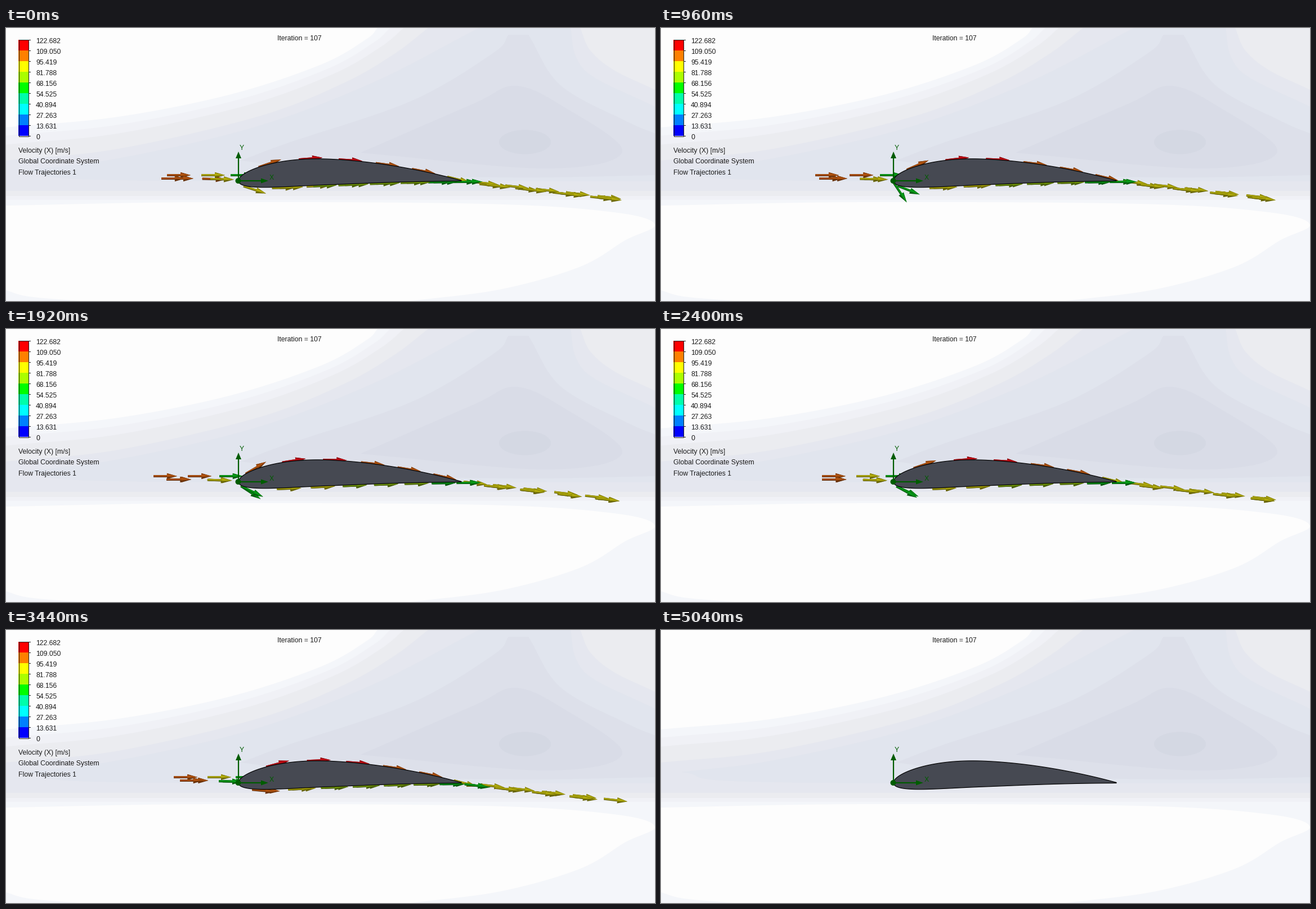
Animation, 1153 px wide and 486 px high, one loop 5080 ms. Source, as a matplotlib script:

```python
import numpy as np
import matplotlib.pyplot as plt
from matplotlib.animation import FuncAnimation
from matplotlib.collections import PolyCollection
from matplotlib.patches import Circle, Ellipse, Polygon, Rectangle

W, H, DPI = 1153, 486, 64
PX = 72 / DPI
FRAMES, STEP_MS = 127, 40

fig = plt.figure(figsize=(W / DPI, H / DPI), dpi=DPI)
ax = fig.add_axes([0, 0, 1, 1])
ax.set_xlim(0, W)
ax.set_ylim(H, 0)
ax.axis("off")


def rgb(r, g, b):
    return r / 255, g / 255, b / 255


def smooth(points, n=16):
    """Catmull-Rom curve through the points."""
    p = np.array(points, float)
    p = np.vstack([2 * p[0] - p[1], p, 2 * p[-1] - p[-2]])
    t = np.linspace(0, 1, n, endpoint=False)[:, None]
    parts = []
    for a, b, c, d in zip(p, p[1:], p[2:], p[3:]):
        parts.append(0.5 * (2 * b + (c - a) * t + (2 * a - 5 * b + 4 * c - d) * t**2
                            + (3 * b - a - 3 * c + d) * t**3))
    return np.vstack(parts + [p[-2:-1]])


def region(color, *curves):
    shape = np.vstack([smooth(c) for c in curves])
    ax.add_patch(Polygon(shape, fc=rgb(*color), lw=0))


def label(x, y, s, color="#1a1a1a"):
    return ax.text(x, y + 4.4, s, color=color, fontsize=12.3 * PX, family="Liberation Sans",
                   va="baseline", zorder=9)


# Pressure field: nested contours, light to dark
NEAR = np.array([(0, 177), (200, 158), (400, 118), (560, 65), (640, 20), (660, 0)])
FAR = np.array([(0, 236), (200, 215), (450, 157), (600, 98), (690, 46), (750, 0)])
WHITE = (253, 253, 253)

ax.add_patch(Rectangle((0, 0), W, H, fc=rgb(244, 246, 250), lw=0))
for s, base, color in [(0.25, 306, (240, 241, 246)), (0.52, 299, (235, 236, 240))]:
    region(color, NEAR + s * (FAR - NEAR), [(W, 0), (W, base)], [(W, base), (0, base)])
region((229, 231, 239), FAR, [(1020, 0), (1038, 40), (1080, 75), (W, 110)],
       [(W, 290), (0, 290)])
region((225, 229, 238),
       [(37, 253), (200, 232), (440, 177), (650, 98), (840, 0)],
       [(1003, 0), (1012, 50), (1045, 88), (W, 140)],
       [(W, 273), (200, 271), (37, 253)])
region((221, 224, 234),
       [(418, 236), (500, 205), (720, 130), (865, 45), (893, 12)],
       [(928, 12), (985, 102), (1100, 165), (W, 188)],
       [(W, 262), (900, 266), (600, 258), (418, 236)])
region((217, 220, 231),
       [(630, 222), (830, 135), (905, 103), (990, 140), (1095, 220), (960, 250), (630, 222)])
ax.add_patch(Ellipse((922, 203), 92, 43, fc=rgb(212, 216, 227), lw=0))
region(WHITE, NEAR, [(660, 0), (0, 0)])
region(WHITE,
       [(0, 316), (350, 310), (850, 313), (1080, 328), (W, 350), (1100, 378), (1020, 425),
        (880, 465), (720, 486)],
       [(130, 486), (40, 478), (0, 467)])

# Airfoil: NACA 4412
NOSE, TAIL, CHORD_Y = 413, 809, 272


def surface(x, side):
    """Height of the upper (side=1) or lower (side=-1) surface on the stage."""
    c = np.clip((x - NOSE) / (TAIL - NOSE), 0, 1)
    half = 0.6 * (0.2969 * np.sqrt(c) - 0.126 * c - 0.3516 * c**2 + 0.2843 * c**3 - 0.1015 * c**4)
    camber = np.where(c < 0.4, 0.25 * (0.8 * c - c**2), (0.2 + 0.8 * c - c**2) / 9)
    return CHORD_Y - (camber + side * half) * (TAIL - NOSE)


chord = NOSE + (TAIL - NOSE) * np.linspace(0, 1, 120) ** 2
wing = np.vstack([np.column_stack([chord, surface(chord, 1)]),
                  np.column_stack([chord, surface(chord, -1)])[::-1]])
ax.add_patch(Polygon(wing, fc=rgb(70, 73, 82), ec="black", lw=1.2 * PX, zorder=4))

# Coordinate triad
GREEN = rgb(0, 92, 0)
ax.plot([413, 413], [272, 230], color=GREEN, lw=2.2 * PX, zorder=6)
ax.plot([413, 455], [272, 272], color=GREEN, lw=2.2 * PX, zorder=6)
ax.add_patch(Polygon([(408, 232), (418, 232), (413, 220)], fc=GREEN, lw=0, zorder=6))
ax.add_patch(Polygon([(453, 267.5), (453, 276.5), (466, 272)], fc=GREEN, lw=0, zorder=6))
ax.add_patch(Circle((412.5, 272), 5, fc=GREEN, lw=0, zorder=6))
label(415, 213, "Y", GREEN)
label(468, 266, "X", GREEN)
label(482, 18, "Iteration = 107")

# Legend
BANDS = ["#ff0000", "#ff8000", "#ffff00", "#aaff00", "#00ff00", "#00ffaa", "#00ffff", "#0080ff",
         "#0000ff"]
TOP_SPEED = 122.6816
legend = [ax.add_patch(Rectangle((22, 21 + 19 * i), 18, 19, fc=c, lw=0))
          for i, c in enumerate(BANDS)]
legend.append(ax.add_patch(Rectangle((22.5, 20.5), 17, 172, fc="none", ec="#202020", lw=PX)))
for i in range(10):
    y = 20.5 + 19.1 * i
    legend += ax.plot([40, 43], [y, y], color="#202020", lw=PX)
    legend.append(label(53, 22.5 + 19 * i, f"{TOP_SPEED * (9 - i) / 9:.3f}" if i < 9 else "0"))
for i, s in enumerate(["Velocity (X) [m/s]", "Global Coordinate System", "Flow Trajectories 1"]):
    legend.append(label(22, 217.5 + 19.6 * i, s))

# Flow arrows
RED, ORANGE, YELLOW = (186, 10, 18), (172, 80, 14), (172, 166, 10)
OLIVE, EMERALD = (118, 156, 10), (6, 150, 22)


def upper_path(x):
    """Level inflow, then the upper surface, then the wake."""
    wake = 0.115 * np.maximum(x - TAIL, 0)
    return np.minimum(262 + 1e3 * (x > 420), surface(x, 1)) * (x > NOSE) + 262 * (x <= NOSE) + wake


def lower_path(x):
    wake = 0.115 * np.maximum(x - TAIL, 0)
    inflow = 268 + 0.025 * np.clip(x - 330, 0, 80)
    return np.where(x < NOSE, inflow, surface(x, -1) + 1.5) + wake


class Stream:
    """Evenly timed arrows whose tails follow a path."""

    def __init__(self, path, keys, tints, speed, phase=0.0):
        self.path, self.tints, self.speed, self.phase = path, tints, speed, phase
        self.u, self.x = smooth(keys).T

    def arrows(self, n):
        first = (n * self.speed + self.phase) % 1 - 1
        for u in np.arange(first, 13.22):
            if u >= -0.5:
                x = np.interp(u, self.u, self.x)
                y0, y, y1 = self.path(np.array([x - 3, x, x + 3]))
                yield x, y, np.arctan2(y1 - y0, 6), next(c for end, c in self.tints if u < end)


# Keys: (arrow count from the inlet, tail x); tints: (upper count, colour)
upper_keys = [(-1, 226), (0, 286), (1, 347), (2, 399), (3, 449), (5, 591), (8, 784), (9, 833),
              (13, 1051), (14, 1111)]
upper_tints = [(0.85, ORANGE), (1.5, YELLOW), (2.5, EMERALD), (3.1, ORANGE), (5.3, RED),
               (7.9, ORANGE), (99, YELLOW)]
lower_keys = [(-1, 219), (0, 291), (1, 363), (2, 422), (3, 486), (4, 546), (7, 712), (9, 804),
              (10, 854), (13, 1052), (14, 1122)]
lower_tints = [(0.8, ORANGE), (1.15, YELLOW), (1.99, EMERALD), (2.1, YELLOW), (2.6, ORANGE),
               (4, YELLOW), (7.7, OLIVE), (9.5, EMERALD), (99, YELLOW)]

streams = [
    Stream(lower_path, lower_keys, lower_tints, 0.1694, -0.21),
    Stream(upper_path, upper_keys, upper_tints, 0.2),
    Stream(lower_path, lower_keys, lower_tints, 0.1656),
]

LENGTH, HEAD, HALF, SHAFT = 42, 18, 5.2, 2
STRIPS = [(-1, 1, 0.6), (-1, 0.4, 0.85), (-0.55, 0.05, 1.06)]
arrows = PolyCollection([], lw=0, zorder=3)
ax.add_collection(arrows)


def facets(x, y, angle, color):
    """Shaft and cone, each in three shaded strips."""
    c, s = np.cos(angle), np.sin(angle)
    rot = np.array([[c, s], [-s, c]])
    neck = LENGTH - HEAD
    for start, end, r0, r1 in [(0, neck, SHAFT, SHAFT), (neck, LENGTH, HALF, 0)]:
        for lo, hi, light in STRIPS:
            quad = [(start, lo * r0), (end, lo * r1), (end, hi * r1), (start, hi * r0)]
            yield np.array(quad) @ rot + (x, y), np.clip(np.array(color) / 255 * light, 0, 1)


def update(n):
    shown = n < FRAMES - 1
    for item in [arrows, *legend]:
        item.set_visible(shown)
    parts = [f for st in streams for a in st.arrows(n) for f in facets(*a)]
    arrows.set_verts([p for p, _ in parts])
    arrows.set_facecolor([c for _, c in parts])
    return [arrows, *legend]


anim = FuncAnimation(fig, update, frames=FRAMES, interval=STEP_MS, repeat=True, repeat_delay=0,
                     blit=False)
plt.show()
```
